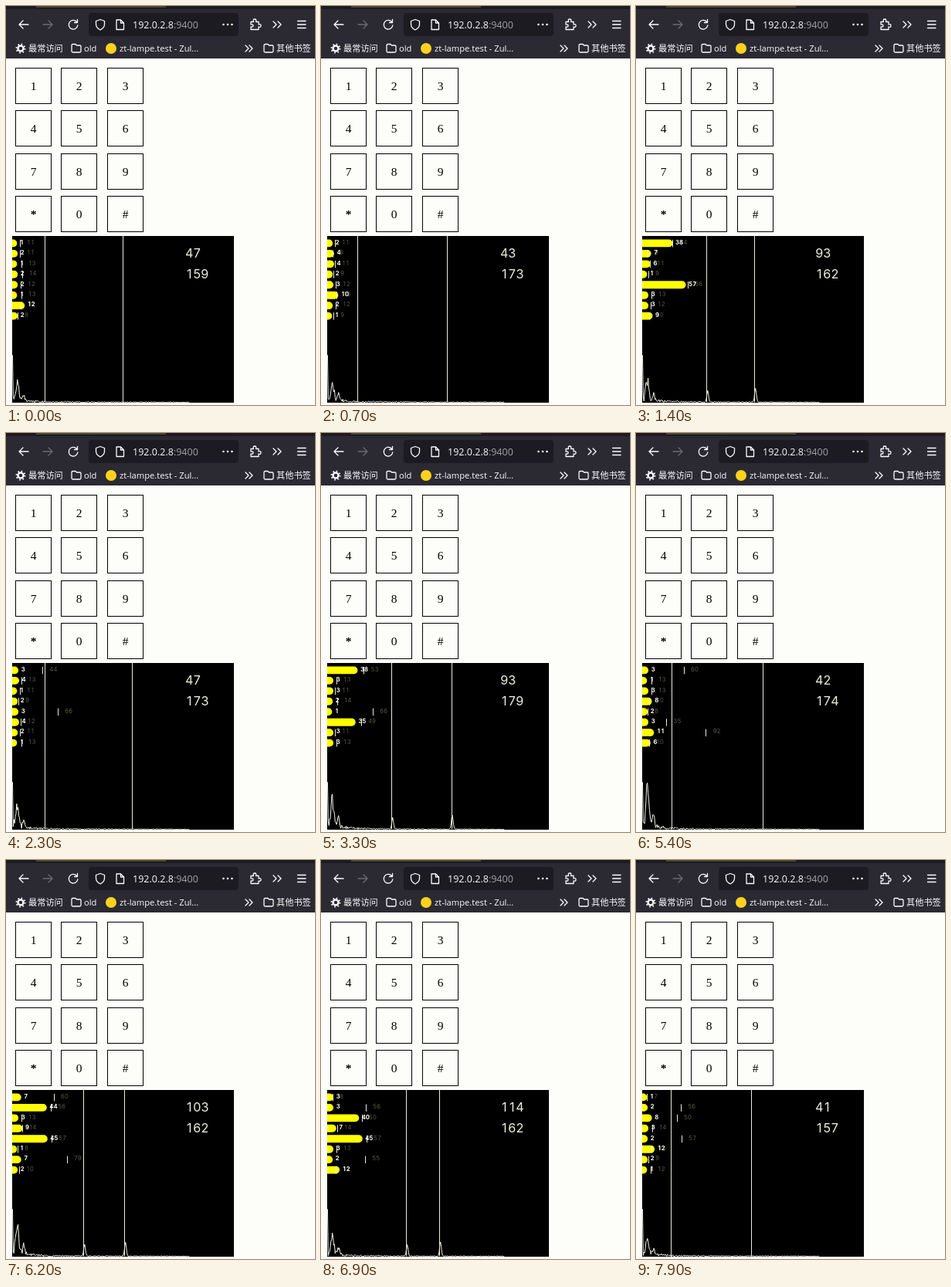
These frames come from a looping animation (400 by 517 pixels, 8000 ms). An HTML page with a canvas:

```html
<!DOCTYPE html>
<html lang="zh">
<head>
<meta charset="utf-8">
<title>Keypad tones</title>
<style>
  html, body { margin: 0; width: 100%; height: 100%; overflow: hidden; background: #fdfdfa; }
  svg, canvas { position: absolute; left: 0; top: 0; display: block; }
  canvas { left: 8px; top: 298px; }
  .ui { font: 11.2px "Open Sans", "Noto Sans CJK SC", "Noto Sans CJK", sans-serif; fill: #fbfbfe; }
  .ui .url { font-size: 12.5px; }
  .icon { fill: none; stroke: #fbfbfe; stroke-width: 1.3; stroke-linecap: round; stroke-linejoin: round; }
  .keys { font: 15.5px "Liberation Serif", serif; text-anchor: middle; }
  .keys rect { fill: none; stroke: #000; }
</style>
</head>
<body>
<svg width="400" height="517">
  <rect width="400" height="68" fill="#2b2a33"/>
  <rect width="400" height="4" fill="#1c1b22"/>
  <rect x="39" width="168" height="2" fill="#4a4830"/>
  <rect x="107" y="9" width="194" height="30" rx="4" fill="#1c1b22"/>
  <g class="icon">
    <path d="M29 24H17m5-5-5 5 5 5"/>
    <path d="M48 24h12m-5-5 5 5-5 5" stroke="#6b6a70"/>
    <path d="M91.5 20.5A5.800 5.800 0 1 0 92.800 25M92.500 17.500v4h-4"/>
    <path d="M122 17.500l5.500 2v4q0 5-5.500 7.500-5.500-2.500-5.500-7.500v-4z"/>
    <path d="M143 18h5.500l4 4v8.500H143zM148.500 18v4h4"/>
    <path d="M317 20.500h3.500q-1-3.500 1.500-3.500t1.500 3.500h3.500v3.500q3-1 3 1.500t-3 1.500v3.500h-10v-3.500q3 .5 3-1.500t-3-1.500z"/>
    <path d="M346 20l4 4-4 4m6-8 4 4-4 4M310 51l4 4-4 4m5-8 4 4-4 4"/>
    <path d="M377.500 19.500h10.500m-10.500 4.500h10.500m-10.500 4.500h10.500"/>
    <path id="folder" d="M85 51.500v7q0 1.500 1.500 1.500h9q1.500 0 1.500-1.500v-6q0-1.500-1.500-1.500h-4l-1.500-1.500h-3.500q-1.500 0-1.500 1.500z"/>
    <use href="#folder" x="249"/>
    <circle cx="19" cy="55" r="3.500" stroke-width="2.400"/>
    <circle cx="19" cy="55" r="5.500" stroke-width="2" stroke-dasharray="1.600 2.720" stroke-linecap="butt"/>
    <path d="M281.500 24h0m5.500 0h0m5.500 0h0" stroke-width="2.600"/>
  </g>
  <circle cx="136" cy="55" r="7" fill="#ffd21e"/>
  <g class="ui">
    <text class="url" x="164" y="28.500">192.0.2.8<tspan fill="#a3a2a8">:9400</tspan></text>
    <text x="29" y="59">最常访问</text>
    <text x="101" y="59">old</text>
    <text x="147" y="59">zt-lampe.test - Zul...</text>
    <text x="350" y="59">其他书签</text>
  </g>
  <g class="keys" id="keys"></g>
</svg>
<canvas id="scope" width="287" height="216"></canvas>
<script>
const STEP = 100, STEPS = 80, SCALE = 0.897, ROWS = 8, MEMORY = 22;

keys.innerHTML = [..."123456789*0#"].map((k, i) => {
  const x = 12.5 + Math.round(i % 3 * 59.4), y = 80.5 + Math.floor(Math.floor(i / 3) * 55.6);
  return `<rect x="${x}" y="${y}" width="46" height="46"/>
    <text x="${x + 23}" y="${y + 28.5}"${k === "*" ? ' font-weight="bold"' : ""}>${k}</text>`;
}).join("");

// Key presses: the two sounding rows with their loudness
const presses = [
  { start: 11, length: 8, loud: { 0: 44, 4: 66 } },
  { start: 28, length: 7, loud: { 0: 53, 5: 49 } },
  { start: 38, length: 6, loud: { 0: 50, 6: 92 } },
  { start: 46, length: 2, loud: { 0: 60, 6: 58 } },
  { start: 55, length: 3, loud: { 1: 40, 6: 55 } },
  { start: 58, length: 5, loud: { 1: 56, 4: 57 } },
  { start: 65, length: 8, loud: { 2: 50, 4: 57 } }
];
const toneHz = [697, 770, 852, 941, 1209, 1336, 1477, 1633], BIN_HZ = 7.48;

const rand = (a, b) => {
  const v = Math.sin(a * 12.9898 + b * 78.233) * 43758.5453;
  return v - Math.floor(v);
};

const pressAt = s => presses.find(p => s >= p.start && s < p.start + p.length);

// A tone swells for one step, then slowly fades; silent rows only flicker
function level(s, r) {
  const press = pressAt(s), loud = press?.loud[r];
  if (loud) {
    const age = s - press.start;
    return Math.round(loud * (age ? 1.07 - 0.07 * age : 0.3));
  }
  const n = rand(s, r);
  return Math.round(1 + 5 * n + 8 * n ** 8);
}

function recentMax(s, r) {
  let max = 0;
  for (let i = 0; i < MEMORY; i++) max = Math.max(max, level(s - i, r));
  return max;
}

function peakBins(s) {
  const press = pressAt(s);
  if (press && s > press.start) return Object.keys(press.loud).map(r => Math.round(toneHz[r] / BIN_HZ));
  return [44 + 3 * Math.cos(0.273 * s), 165 + 9 * Math.sin(0.3927 * s - 0.785)].map(Math.round);
}

const bell = (x, center, width) => Math.exp(-(((x - center) / width) ** 2));

const ctx = scope.getContext("2d");

function line(points, color, width = 1.1) {
  ctx.strokeStyle = color;
  ctx.lineWidth = width;
  ctx.beginPath();
  points.forEach(([x, y]) => ctx.lineTo(x, y));
  ctx.stroke();
}

// Vertical line on whole screen pixels
function rule(bin, top, bottom) {
  const x = (Math.floor((bin + 0.5) * SCALE) + 0.5) / SCALE;
  line([[x, top], [x, bottom]], "#eeeede");
}

function digits(n, x, y, pitch, font, color) {
  ctx.font = font + " Inter, sans-serif";
  ctx.fillStyle = color;
  [...String(n)].forEach((c, i) => ctx.fillText(c, x + pitch * (i + 0.5), y));
}

function drawSpectrum(s, peaks) {
  const hump = (28 + 60 * bell(s, 46, 11)) * (0.85 + 0.3 * rand(s, 1));
  const points = [[0.5, 172]];
  for (let b = 1; b < 256; b++) {
    const n = rand(s, b + 20);
    let v = hump * (bell(b, 7, 3) * (0.75 + 0.25 * n) + 0.3 * bell(b, 16, 2) + 0.4 * n * Math.exp(-b / 15));
    v += 2.5 * n * Math.exp(-b / 200);
    if (pressAt(s)) peaks.forEach((p, i) => v += (16 + 4 * i) * bell(b, p + 1, 1.8));
    points.push([b + 0.5, 240.5 - v]);
  }
  line(points, "#f8f8ea");
}

function draw(s) {
  ctx.setTransform(1, 0, 0, 1, 0, 0);
  ctx.fillStyle = "#000";
  ctx.fillRect(0, 0, 287, 216);
  ctx.scale(SCALE, SCALE);
  ctx.textAlign = "center";
  ctx.lineJoin = "round";

  const peaks = peakBins(s);
  drawSpectrum(s, peaks);
  peaks.forEach((p, i) => {
    rule(p, 0, 240);
    digits(p, 250, 31 + 30 * i, 11.2, "400 18px", "#eeeede");
  });

  for (let r = 0; r < ROWS; r++) {
    const y = 10.5 + 15 * r, v = level(s, r), max = recentMax(s, r);
    ctx.lineCap = "round";
    line([[0.5, y], [v + 0.5, y]], "#ff0", 11);
    ctx.lineCap = "butt";
    rule(max, y - 5, y + 5.5);
    digits(max, max + 10, y + 1.5, 5.6, "400 8.5px", "#5a5a40");
    digits(v, v + 10, y + 1.5, 5.6, "700 8.5px", "#fffff4");
  }
}

function tick() {
  draw(Math.floor(performance.now() / STEP) % STEPS);
  requestAnimationFrame(tick);
}
tick();
</script>
</body>
</html>
```
